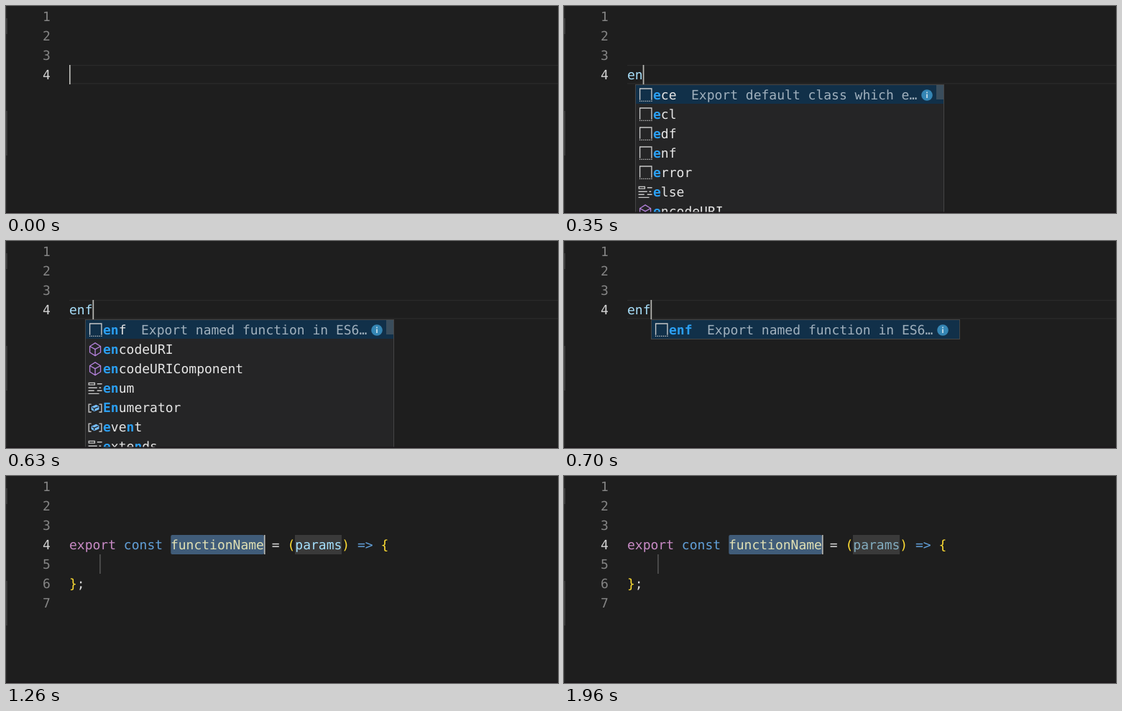
Animation of 768 by 288 pixels, one loop 2030 ms. Source, as an HTML page:

```html
<!DOCTYPE html>
<html lang="en">
<head>
<meta charset="utf-8">
<title>Snippet completion</title>
<style>
  html, body { margin: 0; height: 100%; overflow: hidden; background: #1e1e1e; }
  svg { display: block; width: 768px; height: 288px; }
  text {
    font: 18px "DejaVu Sans Mono", monospace;
    white-space: pre;
    text-rendering: geometricPrecision;
  }
</style>
</head>
<body>
<svg id="stage" viewBox="0 0 768 288"></svg>
<script>
const LOOP = 2030;
const CHAR = 10.837;
const LINE = 27;
const LEFT = 88;
const stage = document.getElementById('stage');

const rect = (x, y, w, h, fill, extra = '') =>
  `<rect x="${x}" y="${y}" width="${w}" height="${h}" fill="${fill}" ${extra}/>`;
const span = (str, color, extra = '') => `<tspan fill="${color}" ${extra}>${str}</tspan>`;
const text = (x, y, content) => `<text x="${x}" y="${y}">${content}</text>`;
const path = (d, color, filled) =>
  `<path d="${d}" ${filled ? `fill="${color}"` : `fill="none" stroke="${color}"`}/>`;
const column = n => LEFT + n * CHAR;
const baseline = line => 21 + (line - 1) * LINE;

// Completion icons on a 16 unit grid
const GREY = '#c8c8c8';
const icons = {
  snippet: path('M2.5 13V1.5h12V13M2 14.2h1m1 0h1m1 0h1m1 0h1m1 0h1m1 0h1m1 0h1', GREY),
  keyword: path('M1.5 2.5h6v2h-6zM10 3.5h5M1 7.5h9m2 0h2M1 10.5h6m3 0h5M1 13.5h11', GREY),
  method: path('M8 1.4L13.5 4.8v6.2L8 14.4 2.5 11V4.8zM2.5 4.8L8 7.8l5.5-3M8 7.8v6.6', '#b180d7'),
  variable: path('M4 4.5H1.5v8H4M12 4.5h2.5v8H12', GREY) +
    path('M4 7.1L9 4.9l3 1.8v3.1L7 12l-3-1.8z', '#75beff', true) +
    path('M4.8 7.7L7 9l4.2-1.9M7 9v2.2', '#252526')
};

const lists = {
  e: {
    detail: 'Export default class which e…',
    items: ['snippet ece', 'snippet ecl', 'snippet edf', 'snippet enf',
      'snippet error', 'keyword else', 'method encodeURI']
  },
  en: {
    detail: 'Export named function in ES6…',
    items: ['snippet enf', 'method encodeURI', 'method encodeURIComponent', 'keyword enum',
      'variable Enumerator', 'variable event', 'keyword extends']
  },
  enf: { detail: 'Export named function in ES6…', items: ['snippet enf'] }
};

// Emphasise the letters that match the query in order
function matched(label, query) {
  let next = 0;
  return [...label].map(ch => {
    const hit = next < query.length && ch.toLowerCase() === query[next];
    if (hit) next++;
    return hit ? span(ch, '#2b9ff2', 'font-weight="bold"') : span(ch, '#e6e6e6');
  }).join('');
}

function popup(query, sliderOpacity) {
  const { detail, items } = lists[query];
  const x = Math.round(column(query.length));
  let out = rect(x + .5, 109.5, 429, items.length * LINE, '#252526', 'stroke="#454545"') +
    rect(x + 1, 110, 428, LINE - 1, '#113049');
  items.forEach((item, i) => {
    const [kind, label] = item.split(' ');
    const y = i * LINE;
    out += `<g transform="translate(${x + 3.2} ${113 + y}) scale(1.36)">${icons[kind]}</g>` +
      text(x + 25, 130 + y, matched(label, query));
  });
  out += text(x + 78, 130, span(detail, '#a0b0bd')) +
    `<circle cx="${x + 406}" cy="124" r="7.8" fill="#3586b4"/>` +
    rect(x + 405.2, 122.5, 1.6, 5.5, '#d5e5ee') + rect(x + 405.2, 119.5, 1.6, 1.7, '#d5e5ee');
  if (items.length > 1)
    out += rect(x + 419, 110, 10, 20, '#797979', `opacity="${.4 * sliderOpacity}"`);
  return out;
}

const cursor = n => rect(column(n).toFixed(1), 82, 1.7, 27, '#b8b8b4');

function lineNumbers(count) {
  let out = '';
  for (let n = 1; n <= count; n++)
    out += text(51, baseline(n), span(n, n === 4 ? '#d2d2d2' : '#858585'));
  return out;
}

function typing(typed, query, sliderOpacity) {
  return lineNumbers(4) +
    rect(LEFT, 82, 680, 1.3, '#2a2a2a') + rect(LEFT, 107.2, 680, 1.3, '#2a2a2a') +
    text(LEFT, baseline(4), span(typed, '#a9e0fb')) + cursor(typed.length) +
    (query ? popup(query, sliderOpacity) : '');
}

function expanded(bracketsColored, paramsDimmed, cursorOn) {
  const plain = '#dcdcdc';
  const bracket = bracketsColored ? '#ffdd33' : plain;
  const code = span('export', '#c98bc6') + span(' const ', '#62a0d9') +
    span('functionName', '#e0e0b4') + span(' = ', plain) + span('(', bracket) +
    span('params', paramsDimmed ? '#83adc0' : '#a5e0fd') + span(')', bracket) +
    span(' =&gt; ', '#62a0d9') + span('{', bracket);
  return lineNumbers(7) +
    rect(229.3, 82, 129.7, 27, '#405c79', 'rx="2"') +
    rect(402, 82, 65, 27, '#3a3a3a') +
    text(LEFT, baseline(4), code) +
    rect(130.3, 109, 1.3, 27, '#606060') +
    text(LEFT, baseline(6), span('}', bracket) + span(';', plain)) +
    (cursorOn ? cursor(25) : '');
}

function scene(t) {
  if (t >= 980) return expanded(t >= 1120, t >= 1330, t < 1470 || t >= 1960);
  const typed = t < 70 ? '' : t < 350 ? 'e' : t < 630 ? 'en' : 'enf';
  const query = t < 140 ? '' : t < 420 ? 'e' : t < 700 ? 'en' : 'enf';
  return typing(typed, query, Math.min(1, (t - 140) / 100));
}

const edges = rect(0, 0, 1.5, 288, '#262626') + rect(0, 17, 1.8, 22, '#3c3c3c') +
  rect(0, 146, 1.8, 62, '#3c3c3c') + rect(0, 286.5, 768, 1.5, '#1b171a');

let shown;
function frame() {
  const markup = scene(performance.now() % LOOP) + edges;
  if (markup !== shown) stage.innerHTML = shown = markup;
  requestAnimationFrame(frame);
}
frame();
</script>
</body>
</html>
```
